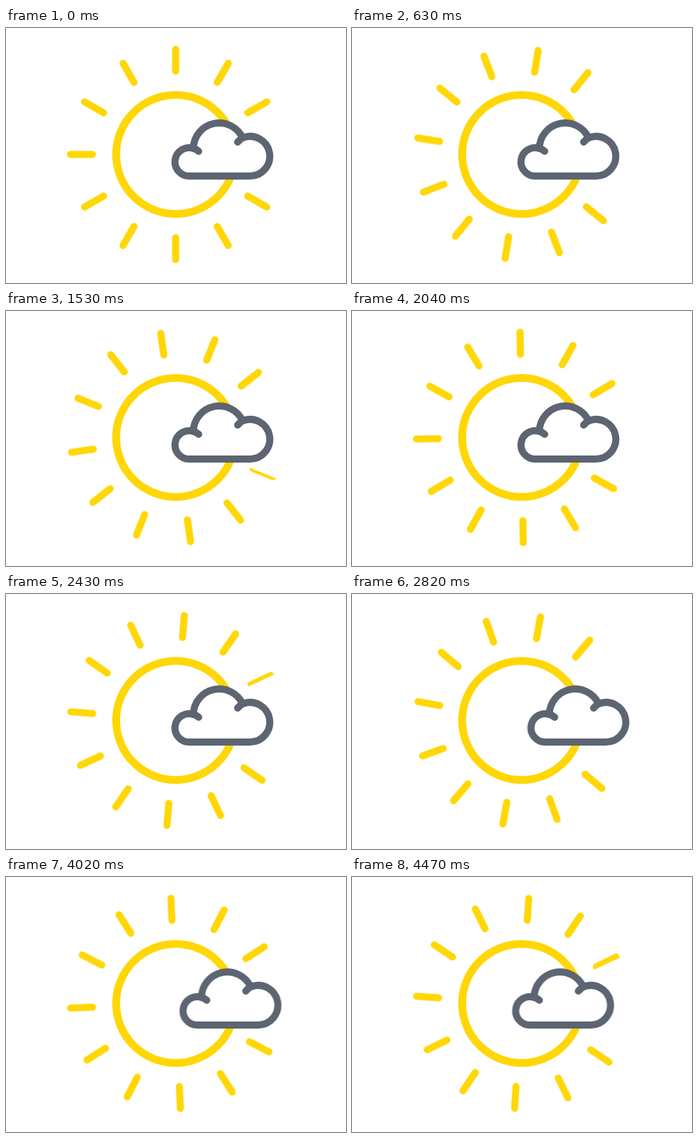
Animation, 480 px wide and 360 px high, one loop 4.5 s. Source, as an HTML page:

```html
<!DOCTYPE html>
<html lang="en">
<head>
<meta charset="utf-8">
<title>Sun and cloud</title>
<style>
  html, body { margin: 0; width: 100%; height: 100%; overflow: hidden; background: #fff; }
  svg { display: block; width: 100vw; height: 100vh; }
  .line { stroke-width: 10; stroke-linecap: round; stroke-linejoin: round; fill: none; }
  .sun { stroke: #ffd706; }
  .cloud { stroke: #5c6571; }
  #rays { transform-origin: 239.5px 178.5px; }
</style>
</head>
<body>
<svg viewBox="0 0 480 360">
  <g id="rays" class="line sun"></g>
  <!-- hides rays passing behind the cloud -->
  <path fill="#fff" d="M239.5 178.5L420.8 94L424.7 254.1Z"/>
  <circle class="line sun" cx="239.5" cy="178.5" r="84" style="stroke-width:11"/>
  <g id="cloud" class="line cloud">
    <path fill="#fff" d="M258.5 209A20 20 0 1 1 264.5 169.9A36.5 36.5 0 0 1 334 155A28 28 0 1 1 344.5 209Z"/>
    <path d="M264.5 169.9A20 20 0 0 1 272 174M334 155A28 28 0 0 0 327 161"/>
  </g>
</svg>
<script>
const LOOP = 4500;
const RAYS = 12;
const DEG_PER_MS = 1 / 70;
const rays = document.getElementById('rays');
const cloud = document.getElementById('cloud');

for (let i = 0; i < RAYS; i++) {
  const ray = document.createElementNS('http://www.w3.org/2000/svg', 'path');
  ray.setAttribute('d', 'M239.5 30V61');
  ray.setAttribute('transform', `rotate(${i * 360 / RAYS} 239.5 178.5)`);
  rays.append(ray);
}

const timing = { duration: LOOP, iterations: Infinity };

rays.animate([
  { transform: 'rotate(0deg)' },
  { transform: `rotate(${LOOP * DEG_PER_MS}deg)` }
], timing);

// time (ms), x offset, easing towards the next step
const drift = [
  [0, 0, 'linear'],
  [2550, 0, 'ease'],
  [3470, 28, 'linear'],
  [3480, 28, 'cubic-bezier(.384,.089,.545,.592)'],
  [LOOP, -8.4, 'linear']
];
cloud.animate(drift.map(([t, x, easing]) => ({
  offset: t / LOOP, transform: `translateX(${x}px)`, easing
})), timing);
</script>
</body>
</html>
```
